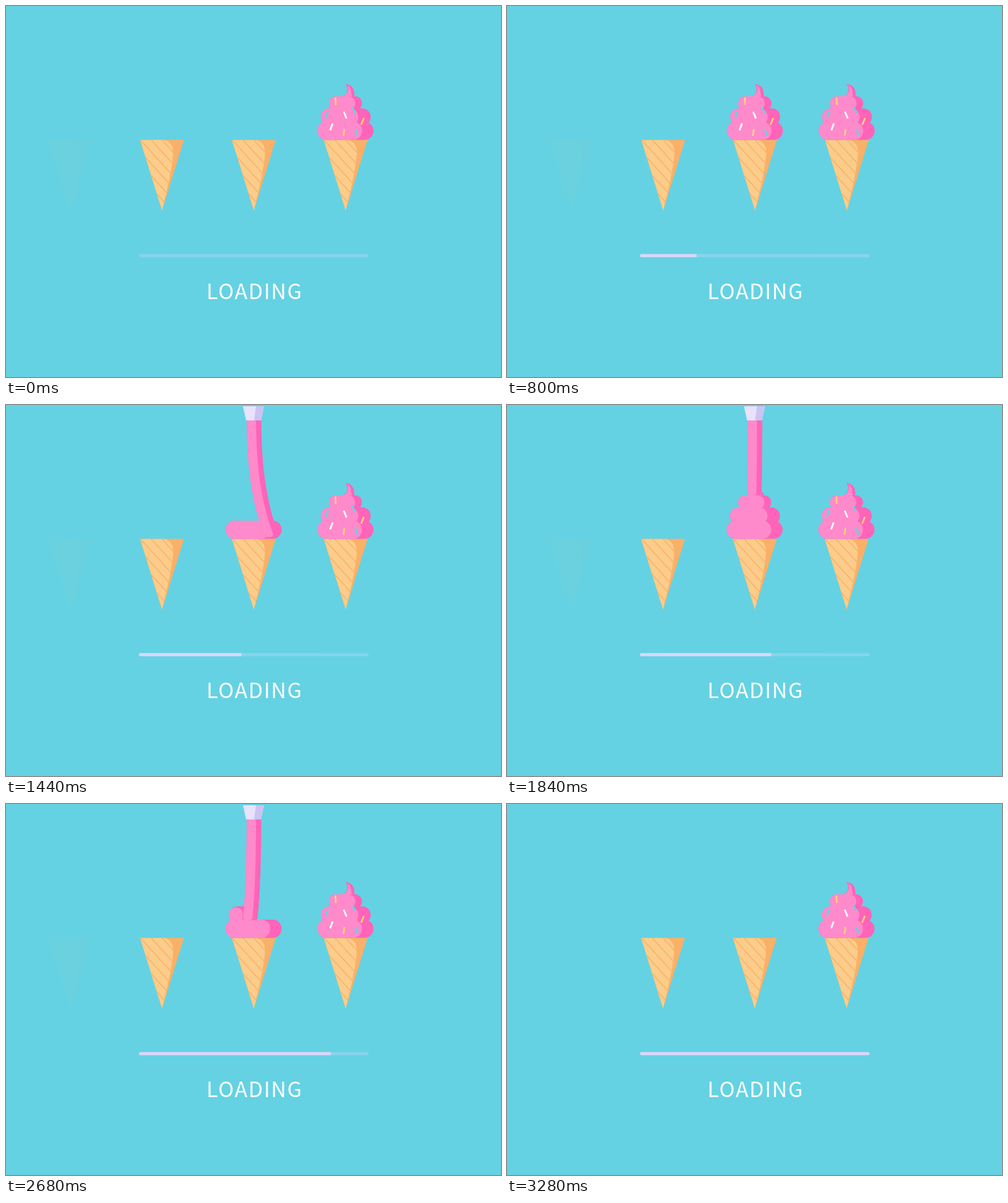
These frames come from a looping animation (800 by 600 pixels, 3440 ms). An HTML page:

```html
<!DOCTYPE html>
<html lang="en">
<head>
<meta charset="utf-8">
<title>Loading</title>
<style>
html, body { margin: 0; height: 100%; overflow: hidden; background: #64d2e3; }
svg { display: block; width: 800px; height: 600px; }
text { font: 34px "Noto Sans CJK SC", "Noto Sans CJK JP", "Open Sans", sans-serif; letter-spacing: 1.6px; fill: #fff; }
</style>
</head>
<body>
<svg viewBox="0 0 800 600">
  <defs>
    <clipPath id="wafer"><path d="M365 216.500H402Q420 219 418.500 240Q416 270 400.500 331Z"/></clipPath>
    <clipPath id="track"><rect x="215" y="401.300" width="371" height="5" rx="2.500"/></clipPath>
    <clipPath id="rise"><rect id="riseBox" x="380" y="120" width="50" height="30"/></clipPath>
  </defs>
  <g id="scene"></g>
  <g clip-path="url(#track)">
    <rect x="215" y="401" width="371" height="6" fill="#88d4ec"/>
    <rect id="bar" x="215" y="401" width="0" height="6" fill="#dcd6fb"/>
  </g>
  <text x="324" y="474">LOADING</text>
</svg>
<script>
const STEP = 40, FRAMES = 86, CYCLE = FRAMES / 3, GAP = 148.4;
const LIGHT = '#ff8acb', DARK = '#ff64b8';
const $ = id => document.getElementById(id);
const clamp = v => Math.min(1, Math.max(0, v));
const part = (t, a, b) => clamp((t - a) / (b - a));
const ease = p => p < .5 ? 4 * p ** 3 : 1 - 4 * (1 - p) ** 3;

// Swirl layers: left, right, top, height, width of shade, start, end
const layers = [
  [355, 445.5, 187, 29.5, 18.5, 4, 7.3],
  [360.5, 441, 165.5, 28, 20, 8.7, 11.1],
  [373.5, 427, 146, 23, 11, 12.1, 14.5]
];
// Landing point of the stream: time, x, y
const landing = [
  [2.4, 400, 25], [4, 370, 214], [7.3, 430, 214], [8.7, 372, 188], [11.1, 430, 188],
  [12.1, 385, 164], [14.5, 416, 164], [15.8, 400, 146], [19, 400, 146]
];
// Sprinkles: x, y, dx, dy, colour
const YELLOW = '#ffd07c', CYAN = '#64d2e3';
const sprinkles = [
  [384, 148, .5, 12, YELLOW], [411.5, 163, 4.5, 10, CYAN], [397.5, 171, 4.5, 11, '#fff'],
  [372, 170, -3.5, 11, CYAN], [430, 181, -4.5, 11, YELLOW], [379.500, 190, -4, 11, '#fff'],
  [398.500, 199, -1.5, 11, YELLOW], [416, 199, 4, 11, CYAN]
];

const path = (d, fill) => `<path d="${d}" fill="${fill}"/>`;

function pill(x, y, w, h, fill) {
  return w > 0 ? `<rect x="${x}" y="${y}" width="${w}" height="${h}" rx="${Math.min(w, h) / 2}" fill="${fill}"/>` : '';
}

// All shades lie behind all lit parts
function swirl(t) {
  let back = '', front = '';
  for (const [left, right, top, h, shade, start, end] of layers) {
    if (t < start) continue;
    const w = 16 + (right - left - 16) * part(t, start, end);
    const lit = w - shade, litH = Math.min(h, lit * 1.2);
    back += pill(left, top, w, h, DARK);
    front += pill(left, top + h - litH, lit, litH, LIGHT);
  }
  return back + front;
}

function cone() {
  const outline = 'M365 216.500H436L400.500 331Z';
  let stripes = '';
  for (let k = 0; k < 7; k++) stripes += `M${400 - 17.5 * k} 216l110 121`;
  return path(outline, '#fbb067') +
    `<g clip-path="url(#wafer)">${path(outline, '#fbcc8a')}
    <path d="${stripes}" stroke="#fbb067" stroke-width="1.500"/></g>`;
}

function cream(t) {
  const tip = path('M387 148Q403 146 403 136Q403 129 400 126Q414.500 128 414.500 142V149Z', DARK) +
    path('M387 148Q402 147 404 137Q405 130 402 127Q409 131 409 138Q409 143 412 148Z', LIGHT);
  const grown = part(t, 16.9, 18.3);
  let out = grown ? `<g${grown < 1 ? ' clip-path="url(#rise)"' : ''}>${tip}</g>` : '';
  out += swirl(t);
  const s = part(t, 18.4, 19.4);
  if (s) for (const [x, y, dx, dy, c] of sprinkles)
    out += `<path d="M${x} ${y}l${dx * s} ${dy * s}" stroke="${c}" stroke-width="2.800"/>`;
  return out;
}

function stream(t) {
  if (t < landing[0][0] || t > 19) return '';
  const i = landing.findIndex(k => k[0] >= t) || 1;
  const [a, xa, ya] = landing[i - 1], [b, xb, yb] = landing[i];
  const q = part(t, a, b), x = xa + (xb - xa) * q, y = ya + (yb - ya) * q;
  const top = 25 + (y - 25) * part(t, 17.8, 19), mid = top + (y - top) * .6;
  const strip = (l, r, fill) => {
    const bl = x - 400 + l - 1, br = x - 400 + r - 1, cap = Math.min(5, (y - top) / 2);
    return path(`M${l} ${top}Q${l} ${mid} ${bl} ${y - cap}Q${bl} ${y} ${bl + 5} ${y}H${br - 5}Q${br} ${y} ${br} ${y - cap}Q${r} ${mid} ${r} ${top}Z`, fill);
  };
  return strip(389, 412.5, DARK) + strip(389, 404, LIGHT);
}

function nozzle(t) {
  const out = 1 - part(t, .5, 2.4) + part(t, 18.2, 20);
  return out < 1 ? `<g transform="translate(0 ${-27 * out})">` +
    path('M383 2H417L412 25H388Z', '#e8e2fd') + path('M404 2H417L412 25H401Z', '#cbc3f1') + '</g>' : '';
}

function place(slot, opacity, body) {
  return `<g transform="translate(${GAP * slot})" opacity="${opacity}">${body}</g>`;
}

function draw(now) {
  const n = Math.min(82, Math.floor(now / STEP) % FRAMES);
  const t = n % CYCLE, p = ease(part(t, 19.6, 24.4));
  $('riseBox').setAttribute('y', 149 - 24 * part(t, 16.9, 18.3));
  $('scene').innerHTML =
    place(p - 2, t < 24 ? Math.max(.04, p) : 1, cone()) +
    place(p - 1, 1, cone()) +
    place(p, 1, cone() + cream(t)) +
    place(p + 1, 1 - p, cone() + cream(CYCLE)) +
    stream(t) + nozzle(t);
  $('bar').setAttribute('width', Math.min(371, Math.max(0, 4.65 * (n - .35))));
}

const begin = performance.now();
(function loop() {
  draw(performance.now() - begin);
  requestAnimationFrame(loop);
})();
</script>
</body>
</html>
```
